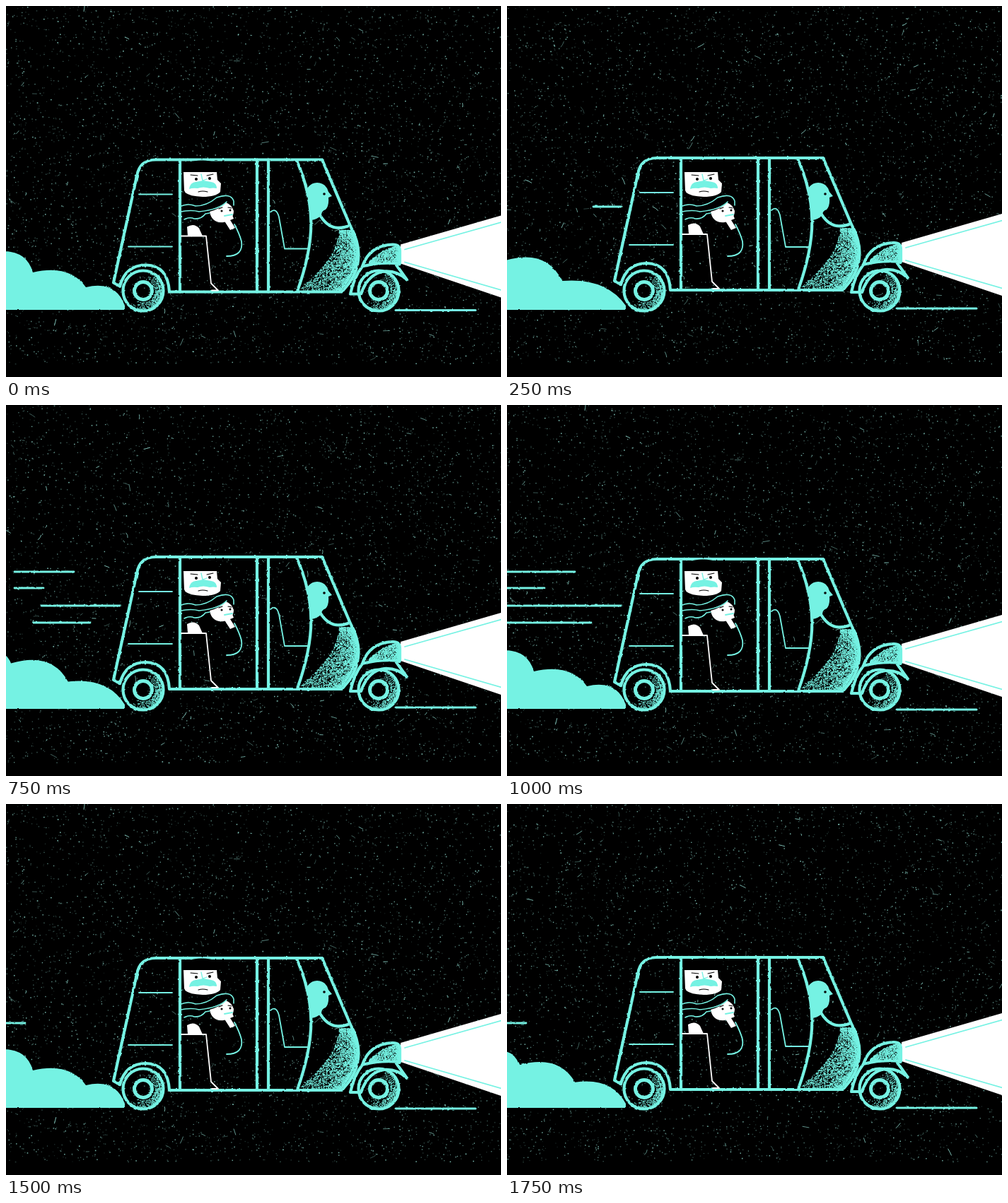
These frames come from a looping animation (700x525 px, 2000 ms). An HTML page with a canvas:

```html
<!DOCTYPE html>
<html lang="en">
<head>
<meta charset="utf-8">
<title>Night ride</title>
<style>
  html, body { margin: 0; width: 100%; height: 100%; overflow: hidden; background: #000; }
  canvas, svg { position: absolute; left: 0; top: 0; width: 700px; height: 525px; }
  svg { fill: none; stroke: #75f2e3; stroke-width: 4.2; stroke-linecap: round; stroke-linejoin: round; }
  .thin { stroke-width: 1.8; }
  .white { fill: #fff; stroke: none; }
  .teal { fill: #75f2e3; stroke: none; }
  .dark { fill: #000; stroke: none; }
  .ink { stroke: #000; stroke-width: 1.1; }
</style>
</head>
<body>
<canvas id="grain" width="700" height="525"></canvas>
<svg viewBox="0 0 700 525">
  <defs>
    <filter id="rough" filterUnits="userSpaceOnUse" x="-10" y="-10" width="720" height="545" color-interpolation-filters="sRGB">
      <feTurbulence type="fractalNoise" baseFrequency=".2" numOctaves="1" seed="4"/>
      <feDisplacementMap in="SourceGraphic" scale="2.6" xChannelSelector="R" yChannelSelector="G"/>
    </filter>
  </defs>

  <g filter="url(#rough)">
    <path id="cloud" class="teal"/>
    <g id="speed" stroke-width="2.8"></g>
    <!-- wheels -->
    <circle cx="194" cy="403" r="28.5"/>
    <circle cx="194" cy="403" r="12.5" stroke-width="5"/>
    <circle cx="527" cy="403" r="28.5"/>
    <circle cx="527" cy="403" r="12.5" stroke-width="5"/>
  </g>

  <g id="beam">
    <path id="cone" class="white"/>
    <path id="rays" class="thin"/>
  </g>

  <g id="car">
    <g filter="url(#rough)">
      <path d="M161 396 L152 391 L185 240 Q189 217 212 217 H447 L487 311 Q511 355 485 392 L475 404 H232"/>
      <path d="M161 396 Q169 366 198 366 Q229 367 231 404"/>
      <path d="M246 217 V404 M355 217 V404 M371 217 V404 M411 218 C438 280 438 330 412 403"/>
      <path d="M445 297 Q460 321 486 310"/>
      <path d="M504 368 Q514 338 547 337 Q557 337 557 346 V364 Q530 361 504 368 Q492 383 487 407 H502 Q512 378 535 375 Q554 374 567 387 L552 366"/>
      <path d="M551 430 H664" stroke-width="3"/>
    </g>
    <path class="thin" d="M188 266 H235 M173 340 H235 M374 291 Q382 284 386 298 L394 343 H427"/>
    <path class="thin" stroke="#fff" d="M248 325 H283 L290 392 L300 402 H291"/>
    <path class="white" d="M257 325 L256 312 Q266 306 273 314 L278 325 Z"/>
  </g>

  <!-- passengers -->
  <path class="dark" d="M249 262 V224 Q275 214 299 222 V240 H254 V262 Z"/>
  <path class="white" d="M251 235 H298 L299 246 L304 251 L303 263 Q297 270 278 270 Q254 269 252 261 Z"/>
  <path class="teal" d="M259 259 Q260 250 268 249 L279 247 L290 249 Q298 250 298 258 Q293 257 288 258 Q279 255 271 258 Q264 257 259 259 Z"/>
  <path d="M276 238 L278 247 L284 245" stroke-width="1.3"/>
  <path class="ink" d="M261 239 L271 240 M284 240 L293 238 M272 263 Q278 261 285 263"/>
  <circle class="dark" cx="269" cy="245" r="2"/>
  <circle class="dark" cx="288" cy="244" r="2"/>

  <path class="dark" d="M248 283 Q268 283 280 278 Q300 266 314 269 Q323 272 323 284 L290 302 L250 302 Z"/>
  <path class="white" d="M288 291 Q303 287 311 278 Q319 281 322 290 Q322 302 308 306 Q291 308 288 291 Z"/>
  <path class="white" d="M307 297 L320 296 L322 301 L317 303 L324 314 L317 317 L308 303 Z"/>
  <path d="M248 283 Q258 279 268 283 Q284 283 298 271 Q318 264 322 276 V282 M248 291 Q262 288 273 291 Q302 288 312 277 M252 302 Q260 298 266 301 Q276 302 282 294 L288 293" stroke-width="1.6"/>
  <path class="thin" d="M323 309 Q330 322 333 333 Q336 354 312 354 M309 297 L320 295"/>
  <path class="ink" d="M301 287 L306 285 M314 285 L319 286"/>
  <circle class="dark" cx="305" cy="290" r="1.5"/>
  <circle class="dark" cx="317" cy="289" r="1.5"/>

  <g id="driver">
    <path class="teal" d="M425 260 Q430 250 440 250 Q453 251 456 263 L461 269 L456 271 Q457 283 452 288 Q446 290 446 296 Q440 302 432 303 Q432 280 425 260 Z"/>
    <circle class="dark" cx="450" cy="266" r="1.8"/>
  </g>
</svg>

<script>
const STEP = 250, STEPS = 8;
const el = id => document.getElementById(id);
const ctx = el('grain').getContext('2d');

// One value per step
const bounce = [.5, -2, 2.5, -2, 1, -1, 1, 0];
const puff = [0, 1, 0, .72, 0, .62, 0, .48];
const seeds = [1, 2, 1, 3, 1, 4, 1, 5];

// Cloud outline at both ends of its drift
const cloudNear = [-2, 347, 30, 348, 38, 377, 90, 365, 113, 398, 155, 388, 168, 424];
const cloudFar = [-45, 350, -13, 342, -5, 361, 55, 342, 78, 389, 140, 384, 168, 424];

// Speed lines: y, right end, then first step and left end for each step
const speedLines = [
  [284, 162, 1, 122, 78, 50, 0],
  [236, 96, 2, 55, 12, 0, 0],
  [308, 119, 2, 78, 38, 0],
  [259, 53, 3, 12, 0, 0],
  [310, 27, 5, 0, 0, 0]
];

function random(seed) {
  let s = seed * 7919;
  return () => {
    s = (s * 1664525 + 1013904223) >>> 0;
    return s / 4294967296;
  };
}

function dot(x, y, size) {
  ctx.fillRect(x, y, size, size);
}

function drawGrain(seed) {
  const r = random(seed);
  ctx.fillStyle = ctx.strokeStyle = '#8fd8cd';
  for (let i = 0; i < 5000; i++) {
    ctx.globalAlpha = .2 + .65 * r() ** 2;
    dot(r() * 700, r() * 506, .9 + r() * .8);
  }
  ctx.lineWidth = 1;
  for (let i = 0; i < 130; i++) {
    const x = r() * 700, y = r() * 500, a = r() * 6.3, len = 2 + 9 * r() ** 2;
    ctx.globalAlpha = .3 + .6 * r();
    ctx.beginPath();
    ctx.moveTo(x, y);
    ctx.quadraticCurveTo(x + len * Math.cos(a) / 2 + r() * 2, y + len * Math.sin(a) / 2,
      x + len * Math.cos(a), Math.min(506, y + len * Math.sin(a)));
    ctx.stroke();
  }
  ctx.globalAlpha = 1;
}

function drawShading(dy) {
  const r = random(77);
  ctx.fillStyle = '#75f2e3';
  for (const cx of [194, 527]) {
    for (let i = 0; i < 600; i++) {
      const a = .5 + (r() + r() - 1) * 1.9, d = 27 - 11 * r() ** 1.8;
      dot(cx + d * Math.cos(a), 403 + d * Math.sin(a), 1.1);
    }
  }
  for (let i = 0; i < 3600; i++) {
    const u = r(), y = 316 + 86 * u;
    const edge = 497 - .0076 * (y - 345) ** 2;
    dot(edge - (20 + 42 * u) * r() ** 2, y + dy, 1.2);
  }
  for (let i = 0; i < 1100; i++) {
    const d = 42 * r() ** 1.9;
    const top = 339 + d * d / 80;
    dot(555 - d, top + (363 - top) * r() + dy, 1.2);
  }
}

function draw(step) {
  const dy = bounce[step];
  ctx.clearRect(0, 0, 700, 525);
  drawGrain(seeds[step]);
  drawShading(dy);

  const p = cloudNear.map((v, i) => v + (cloudFar[i] - v) * puff[step]);
  el('cloud').setAttribute('d',
    `M${p[0]} ${p[1]} Q${p.slice(2, 6)} Q${p.slice(6, 10)} Q${p.slice(10)} L168 430 H-50 Z`);

  el('speed').innerHTML = speedLines.map(([y, right, first, ...left]) => {
    const x = left[step - first];
    return x === undefined ? '' : `<path d="M${x || -5} ${y}H${right}"/>`;
  }).join('');

  el('cone').setAttribute('d',
    `M558 ${337 + dy} L700 ${296 + dy} V${412 + dy} L558 ${364 + dy} Z`);
  el('rays').setAttribute('d',
    `M564 ${344 + dy} L702 ${305 + dy} M564 ${362 + dy} L702 ${402 + dy}`);

  el('car').setAttribute('transform', `translate(0 ${dy})`);
  el('driver').setAttribute('transform', `translate(0 ${step === 5 ? -5 : 0})`);
}

let shown = -1;
function tick() {
  const step = Math.floor(performance.now() / STEP) % STEPS;
  if (step !== shown) draw(shown = step);
  requestAnimationFrame(tick);
}
tick();
</script>
</body>
</html>
```
